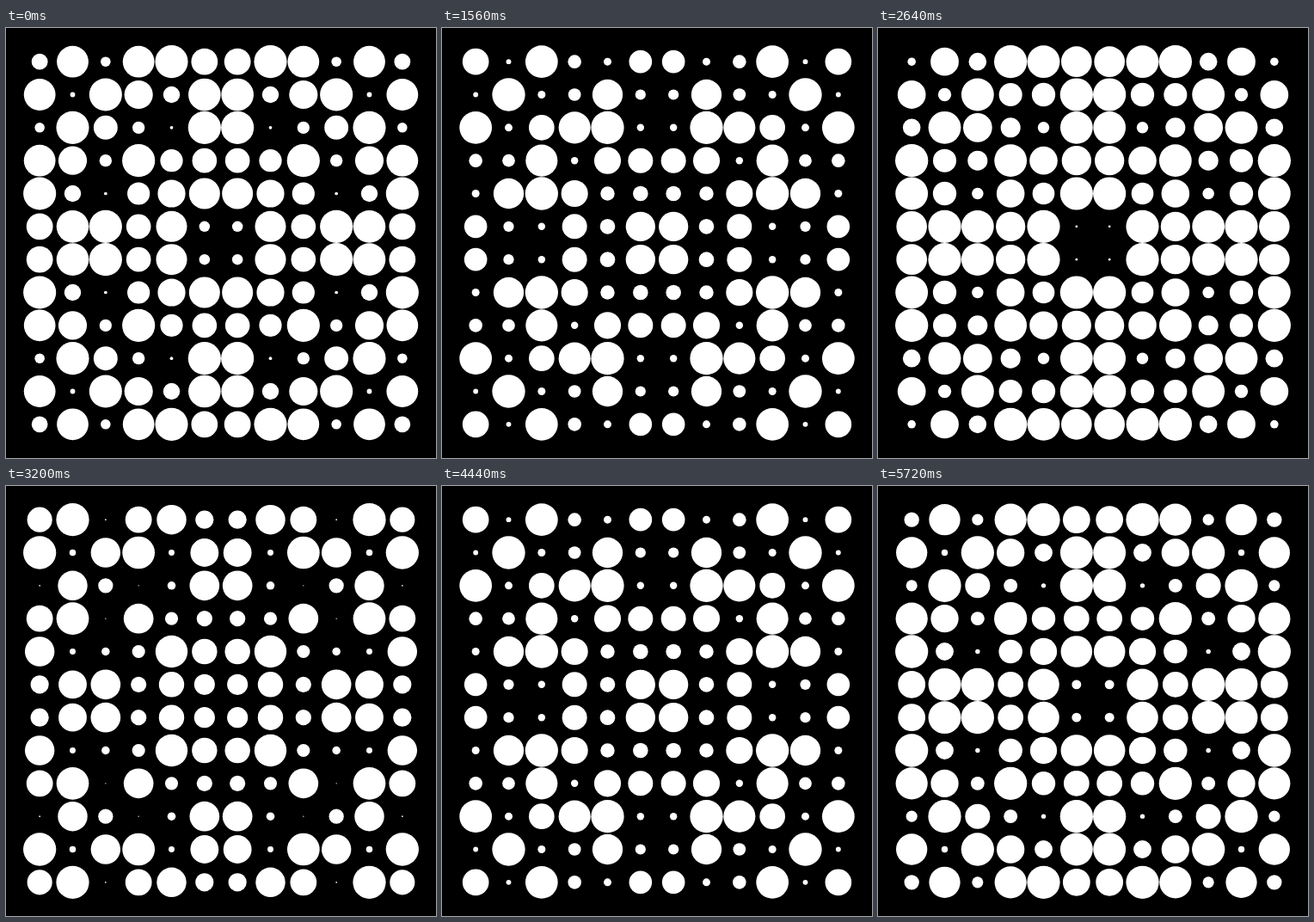
An HTML page with a canvas for the animation above (5.76 s loop, 500 by 500 pixels).

```html
<!DOCTYPE html>
<html lang="en">
<head>
<meta charset="utf-8">
<title>Pulsing dots</title>
<style>
html, body { margin: 0; height: 100%; overflow: hidden; background: #000; }
canvas { display: block; }
</style>
</head>
<body>
<canvas id="stage" width="500" height="500"></canvas>
<script>
const ctx = document.getElementById('stage').getContext('2d');
const COUNT = 12, MARGIN = 20, CENTER = 250;
const CELL = (500 - 2 * MARGIN) / COUNT;
const LOOP = 5760, STEP = 40;

function draw(time) {
  const turn = Math.floor(time % LOOP / STEP) * STEP / LOOP * 2 * Math.PI;
  ctx.fillStyle = '#000';
  ctx.fillRect(0, 0, 500, 500);
  ctx.fillStyle = '#fff';
  for (let row = 0; row < COUNT; row++) {
    for (let col = 0; col < COUNT; col++) {
      const x = MARGIN + (col + 0.5) * CELL;
      const y = MARGIN + (row + 0.5) * CELL;
      // Half a turn of phase per pixel of distance from the centre
      const phase = Math.PI * Math.hypot(x - CENTER, y - CENTER);
      ctx.beginPath();
      ctx.arc(x, y, CELL / 2 * Math.abs(Math.sin(turn + phase)), 0, 2 * Math.PI);
      ctx.fill();
    }
  }
}

function tick() {
  draw(performance.now());
  requestAnimationFrame(tick);
}
tick();
</script>
</body>
</html>
```
